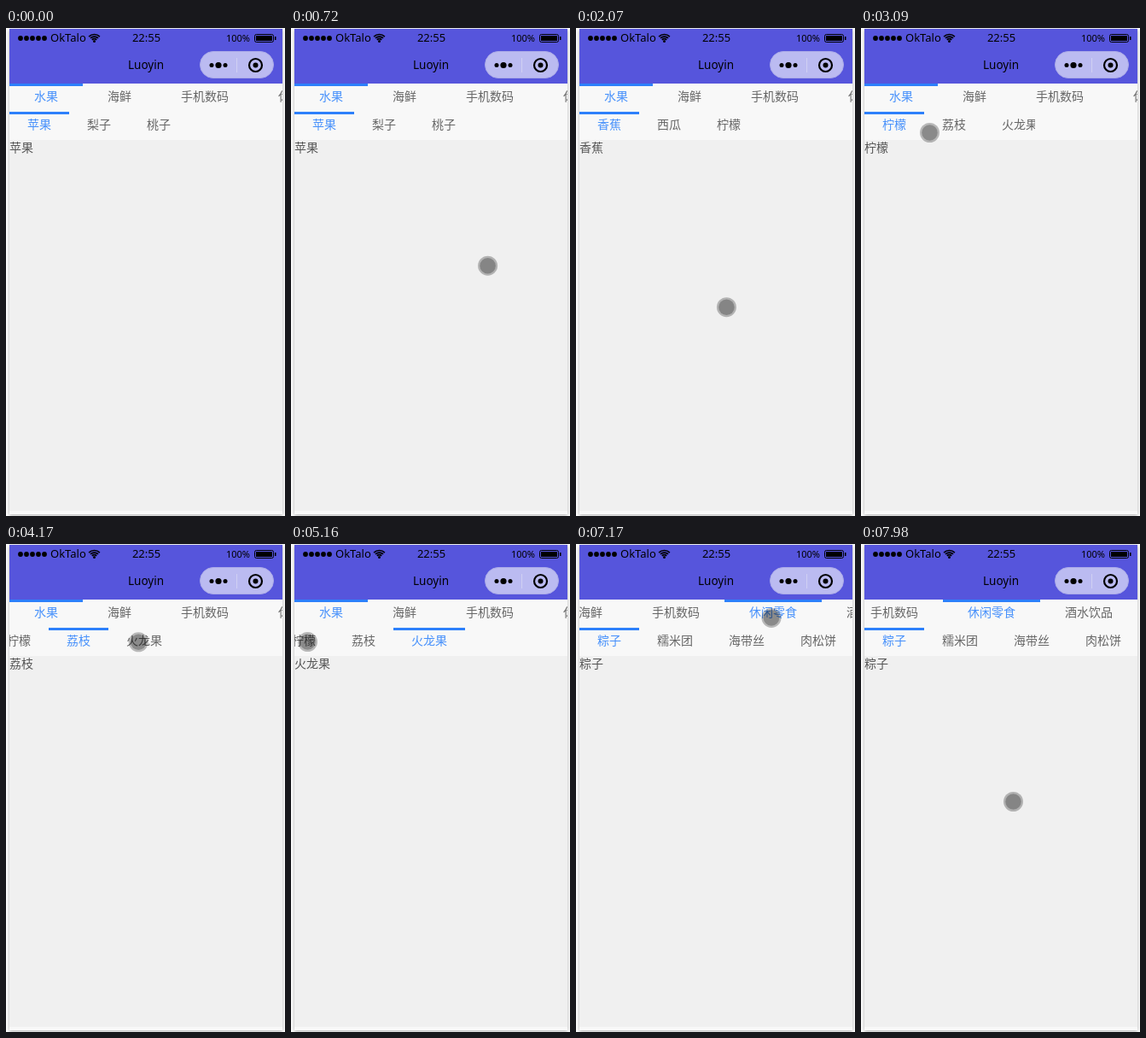
An HTML page with a canvas for the animation above (8000 ms loop, 327x571 px).

```html
<!DOCTYPE html>
<html lang="zh-CN">
<head>
<meta charset="utf-8">
<style>
  html, body { margin: 0; width: 100%; height: 100%; overflow: hidden; background: #fff; }
  canvas { display: block; width: 327px; height: 571px; }
</style>
</head>
<body>
<canvas></canvas>
<script>
const LOOP = 8000, STEP = 30, SCROLL_MS = 200;
const WIDTH = 327, HEIGHT = 571, LEFT = 4, VIEW = 320, SHORT_VIEW = 200;
const CJK = '"Noto Sans CJK SC", "Noto Sans CJK", sans-serif';
const LATIN = '"Noto Sans", "Open Sans", sans-serif';
const BLUE = '#2d80fb', ACTIVE = '#4690fb', INK = '#000';

const tabs = ['水果', '海鲜', '手机数码', '休闲零食', '酒水饮品'];
const goods = [
  ['苹果', '梨子', '桃子', '香蕉', '西瓜', '柠檬', '荔枝', '火龙果'],
  ['小龙虾', '鲢鱼', '大鱼', '小鱼', '紫菜'],
  [],
  ['粽子', '糯米团', '海带丝', '肉松饼']
];

// The finger comes in, swings left and right to swipe, then taps its way around.
const ENTER = 180, SWIPE_START = 736, SWIPE_PERIOD = 476, SWIPES = 5;
const SWIPE_END = SWIPE_START + SWIPE_PERIOD * (SWIPES - 0.5);

// A tap happens as its move begins, where the finger was resting.
const moves = [
  { start: SWIPE_END, end: 3090, to: [80, 122] },
  { start: 3090, end: 3480, to: [136, 115] },
  { start: 3720, end: 4410, to: [162, 114], tap: '荔枝' },
  { start: 4560, end: 5160, to: [19, 114], tap: '火龙果' },
  { start: 5310, end: 5640, to: [133, 82], tap: '柠檬' },
  { start: 5880, end: 6180, to: [218, 83], tap: '海鲜' },
  { start: 6180, end: 6990, to: [229, 85] },
  { start: 7140, end: 7920, to: [118, 293], tap: '休闲零食' },
  { start: 7920, end: 7980, to: [178, 301] }
];

function selection(label) {
  const tab = tabs.indexOf(label);
  return tab < 0 ? { tab: 0, item: goods[0].indexOf(label) } : { tab, item: 0 };
}

const choices = [
  { time: 0, tab: 0, item: 0 },
  ...Array.from({ length: SWIPES }, (_, i) => (
    { time: SWIPE_START + SWIPE_PERIOD * (i + 0.35), tab: 0, item: i + 1 }
  )),
  ...moves.filter(move => move.tap).map(move => ({ time: move.start, ...selection(move.tap) }))
];

const canvas = document.querySelector('canvas');
const ctx = canvas.getContext('2d');
const scale = window.devicePixelRatio || 1;
canvas.width = WIDTH * scale;
canvas.height = HEIGHT * scale;

const mix = (a, b, k) => a + (b - a) * k;
const mixPoint = (a, b, k) => [mix(a[0], b[0], k), mix(a[1], b[1], k)];
const progress = (t, start, end) => Math.max(0, Math.min(1, (t - start) / (end - start)));
const smooth = k => k * k * (3 - 2 * k);
const easeOut = k => 1 - (1 - k) ** 2;

function rect(x, y, w, h, color) {
  ctx.fillStyle = color;
  ctx.fillRect(x, y, w, h);
}

function roundRect(x, y, w, h, r) {
  ctx.beginPath();
  ctx.roundRect(x, y, w, h, r);
}

function dot(x, y, r, color) {
  ctx.fillStyle = color;
  ctx.beginPath();
  ctx.arc(x, y, r, 0, Math.PI * 2);
  ctx.fill();
}

function ring(x, y, r, width, from = 0, to = Math.PI * 2) {
  ctx.strokeStyle = INK;
  ctx.lineWidth = width;
  ctx.beginPath();
  ctx.arc(x, y, r, from, to);
  ctx.stroke();
}

function text(string, x, y, size, color, family = CJK, align = 'left') {
  ctx.font = `${size}px ${family}`;
  ctx.textAlign = align;
  ctx.fillStyle = color;
  ctx.fillText(string, x, y);
}

function layout(labels, padding) {
  let total = 0;
  const items = labels.map(label => {
    const item = { label, x: total, width: label.length * 14 + 2 * padding };
    total += item.width;
    return item;
  });
  return { items, padding, total };
}

const tabRow = layout(tabs, 29);
const goodsRows = goods.map(labels => layout(labels, 21));

const scrollTarget = (row, index, view) =>
  Math.max(0, Math.min(row.items[index].x, row.total - view));

function drawRow(row, active, scroll, top, view) {
  ctx.save();
  ctx.beginPath();
  ctx.rect(LEFT, top, view, 33);
  ctx.clip();
  row.items.forEach(({ label, x, width }, i) => {
    const left = LEFT + x - scroll;
    if (i === active) rect(left, top, width, 3, BLUE);
    text(label, left + row.padding, top + 20, 14, i === active ? ACTIVE : '#666');
  });
  ctx.restore();
}

function drawStatusBar() {
  for (let i = 0; i < 5; i++) dot(17 + i * 7, 12, 2.9, INK);
  text('OkTalo', 52, 16, 13, INK, LATIN);
  for (let r = 3.8; r < 10; r += 2.6) ring(103.5, 16.5, r, 1.7, -Math.PI * 0.75, -Math.PI * 0.25);
  dot(103.5, 15.5, 1.5, INK);
  text('22:55', 164.5, 16, 13, INK, LATIN, 'center');
  text('100%', 286, 16, 11, INK, LATIN, 'right');

  ctx.strokeStyle = INK;
  ctx.lineWidth = 1;
  roundRect(291.5, 7.5, 22, 9, 2);
  ctx.stroke();
  rect(293, 9, 19, 6, INK);
  rect(315, 10, 1.5, 4, INK);
}

function drawTitleBar() {
  text('Luoyin', 164, 48, 13.5, INK, LATIN, 'center');

  roundRect(227.5, 27.5, 86, 31, 15.5);
  ctx.fillStyle = '#bbbbf1';
  ctx.fill();
  ctx.strokeStyle = '#acabe8';
  ctx.lineWidth = 1;
  ctx.stroke();
  rect(270, 35, 1, 17, '#d0d0f3');
  for (const side of [-1, 0, 1]) dot(249 + side * 8, 43.5, side ? 2.5 : 3.6, INK);
  dot(292.5, 43.5, 3, INK);
  ring(292.5, 43.5, 7.5, 2.2);
}

function drawPhone() {
  ctx.save();
  ctx.shadowColor = 'rgba(0,0,0,.35)';
  ctx.shadowBlur = 4 * scale;
  ctx.shadowOffsetY = scale;
  rect(LEFT, 1, VIEW, 568, '#f8f8f8');
  ctx.restore();
  rect(LEFT, 131, VIEW, 434, '#f0f0f0');
  rect(LEFT, 1, VIEW, 64, '#5655dc');
  drawStatusBar();
  drawTitleBar();
}

function drawShop(t) {
  const index = choices.findLastIndex(choice => choice.time <= t);
  const { time, tab, item } = choices[index];
  const old = choices[Math.max(0, index - 1)];
  const k = easeOut(progress(t, time, time + SCROLL_MS));

  const tabFrom = scrollTarget(tabRow, old.tab, VIEW);
  drawRow(tabRow, tab, mix(tabFrom, scrollTarget(tabRow, tab, VIEW), k), 65, VIEW);

  const row = goodsRows[tab];
  const view = tab === 0 ? SHORT_VIEW : VIEW;
  const from = old.tab === tab ? scrollTarget(row, old.item, view) : 0;
  drawRow(row, item, mix(from, scrollTarget(row, item, view), k), 98, view);
  text(row.items[item].label, LEFT, 145, 14, '#555');
}

function swipePoint(t) {
  const age = t - SWIPE_START;
  return [
    150 + 80 * Math.cos(age / SWIPE_PERIOD * Math.PI * 2),
    328 - 50 * Math.exp(-age / 400)
  ];
}

function fingerPoint(t) {
  if (t < SWIPE_START) {
    return mixPoint([270, 160], swipePoint(SWIPE_START), smooth(progress(t, ENTER, SWIPE_START)));
  }
  return moves.reduce(
    (point, { start, end, to }) => mixPoint(point, to, smooth(progress(t, start, end))),
    swipePoint(Math.min(t, SWIPE_END))
  );
}

function drawFinger(t) {
  if (t < ENTER) return;
  const [x, y] = fingerPoint(t);
  dot(x + 0.5, y + 0.5, 11.5, 'rgba(0,0,0,.26)');
  dot(x + 0.5, y + 0.5, 9.3, 'rgba(0,0,0,.25)');
}

function draw(t) {
  ctx.setTransform(scale, 0, 0, scale, 0, 0);
  rect(0, 0, WIDTH, HEIGHT, '#fff');
  drawPhone();
  drawShop(t);
  drawFinger(t);
}

const begin = performance.now();

function tick() {
  const elapsed = (performance.now() - begin) % LOOP;
  draw(Math.floor(elapsed / STEP) * STEP);
  requestAnimationFrame(tick);
}

tick();
</script>
</body>
</html>
```
